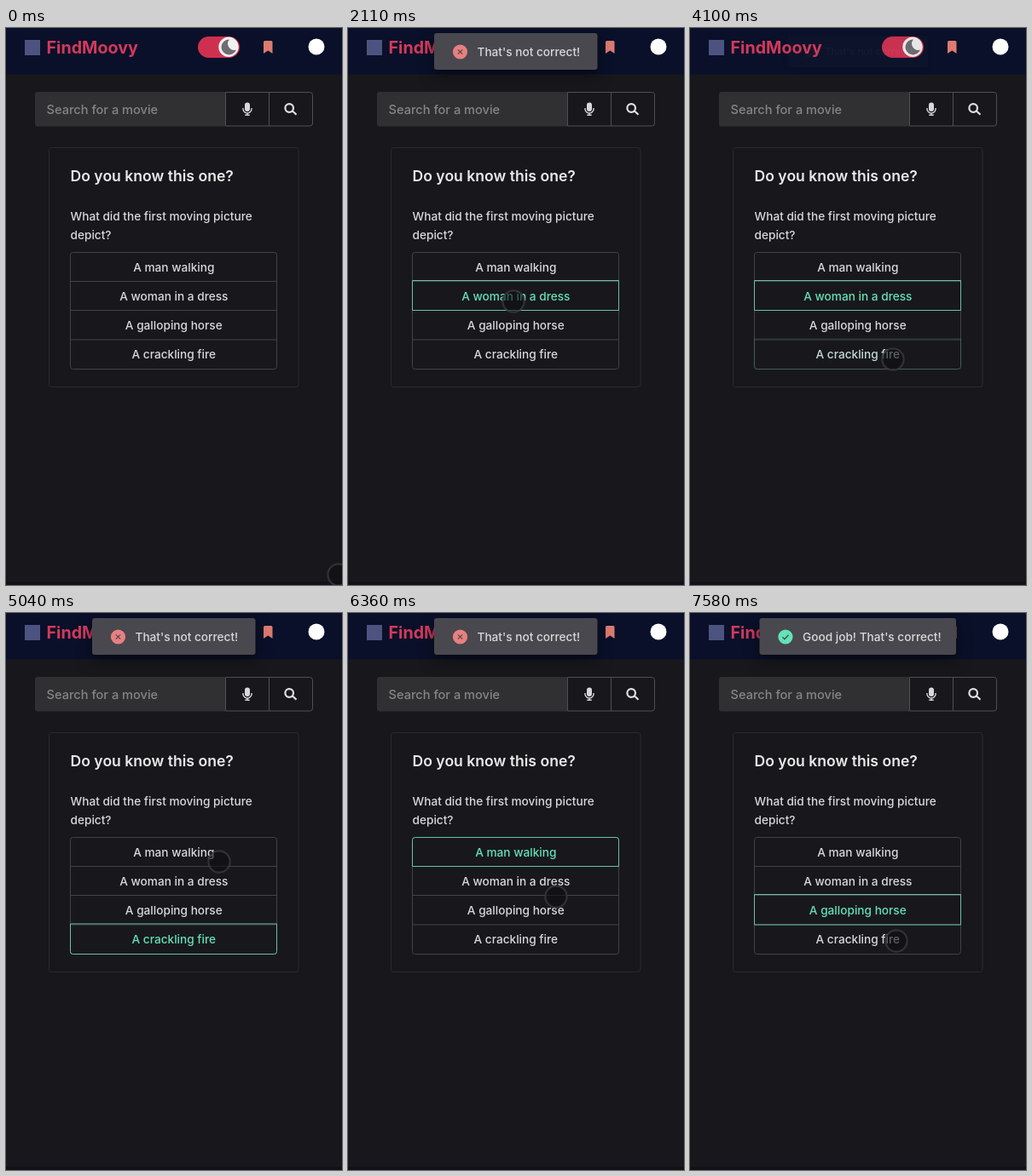
Write an HTML page that moves like this. It is 394 by 654 pixels and loops after 8000 ms.

```html
<!DOCTYPE html>
<html lang="en">
<head>
<meta charset="utf-8">
<title>Movie quiz</title>
<style>
  html, body { margin: 0; width: 100%; height: 100%; overflow: hidden; background: #18181c; }
  svg { display: block; width: 394px; height: 654px; font: 450 13.65px Inter, sans-serif; fill: #d9d9da; }
  .line { fill: none; stroke: #434347; }
  .lit { fill: none; stroke: #68c2a5; }
  .option text { text-anchor: middle; }
  .toast { transform-box: fill-box; transform-origin: center; }
  .toast > rect {
    fill: #48484e;
    filter: drop-shadow(0 3px 4px #0004) drop-shadow(0 6px 9px #0005);
  }
</style>
</head>
<body>
<svg viewBox="0 0 394 654">
  <rect width="394" height="654" fill="#18181c"/>
  <rect y="650" width="394" height="4" fill="#131118"/>
  <rect width="394" height="54.5" fill="#0a1029"/>

  <!-- header -->
  <rect x="22" y="14" width="18" height="18" fill="#4c5380"/>
  <text x="47.5" y="30" font-size="19.7" font-weight="700" fill="#d23a5b">FindMoovy</text>
  <rect x="225" y="10" width="49" height="25" rx="12.5" fill="#d03050"/>
  <circle cx="261" cy="22.3" r="11.7" fill="#f1f0f0"/>
  <path d="M262 13.4A9 9 0 1 0 270 25.500A7.500 7.500 0 0 1 262 13.400z" fill="#6d6d70"/>
  <path d="M302 16.5q0-1.5 1.5-1.5h7.5q1.5 0 1.5 1.5v13.5l-5.2-3.5l-5.3 3.5z" fill="#dc7b70"/>
  <circle cx="364" cy="22" r="9.5" fill="#fff"/>

  <!-- search bar -->
  <path d="M257 75H37q-3 0-3 3v34.5q0 3 3 3h220z" fill="#303033"/>
  <text x="47.5" y="100.5" font-size="14.6" fill="#858588">Search for a movie</text>
  <path class="line" style="stroke:#505054" d="M257.5 75.5h99q3 0 3 3v33.5q0 3-3 3h-99zM308.5 75.5v39.5"/>
  <rect x="280" y="87.5" width="6" height="10.5" rx="3"/>
  <path d="M278 94v1a5 5 0 0 0 10 0v-1M283 100v2.5M280.3 102.3h5.4" fill="none" stroke="#d7d7d9" stroke-width="1.4"/>
  <path d="M337 94a4.8 4.8 0 1 1-9.6 0a4.8 4.8 0 0 1 9.6 0M335.8 97.3l4.7 4.5" fill="none" stroke="#e0e0e2" stroke-width="2.2"/>

  <!-- quiz card -->
  <rect class="line" style="stroke:#2a2a2e" x="50.5" y="140.5" width="292.5" height="281" rx="3"/>
  <text x="75.5" y="180" font-size="17.6" font-weight="600" fill="#e9e9ea">Do you know this one?</text>
  <text x="75.5" y="226">What did the first moving picture</text>
  <text x="75.5" y="248">depict?</text>
  <g id="options"></g>

  <g id="cursor">
    <circle id="ring" r="12.6" fill="#0f0f12" fill-opacity=".6" stroke="#3a3a3d" stroke-opacity=".8" stroke-width="2.2"/>
    <g id="press">
      <circle cx="1" cy="1" r="12.5" fill="#30301a" opacity=".7"/>
      <circle r="12" fill="#8c8c08" opacity=".88"/>
    </g>
  </g>

  <g id="wrong" class="toast">
    <rect x="101" y="6" width="191.5" height="43" rx="3"/>
    <circle cx="131.5" cy="28" r="8.6" fill="#e88080"/>
    <path d="M128.8 25.3l5.4 5.4m0-5.4l-5.4 5.4" stroke="#48484e" stroke-width="1.1"/>
    <text x="151.5" y="33">That's not correct!</text>
  </g>
  <g id="right" class="toast">
    <rect x="81.5" y="6" width="230.5" height="43" rx="3"/>
    <circle cx="112" cy="28" r="8.6" fill="#63e2b7"/>
    <path d="M108.5 28.3l2.4 2.4l4.6-5" fill="none" stroke="#48484e" stroke-width="1.3"/>
    <text x="132" y="33">Good job! That's correct!</text>
  </g>
</svg>
<script>
const LOOP = 8000, FADE = 300, HOLD = 1050;
const $ = id => document.getElementById(id);
const clamp = v => Math.max(0, Math.min(1, v));
const ease = v => { v = clamp(v); return v * v * (3 - 2 * v); };
const mix = (a, b, k) => `rgb(${a.map((v, i) => Math.round(v + (b[i] - v) * k))})`;

const labels = ["A man walking", "A woman in a dress", "A galloping horse", "A crackling fire"];
const edges = [263.5, 297.5, 331.5, 366, 400.5];

// each answer: option index, press start and end, reaction time
const answers = [
  { option: 1, down: 1510, up: 1670, react: 1770 },
  { option: 3, down: 3890, up: 4050, react: 4060 },
  { option: 0, down: 5400, up: 5540, react: 5660 },
  { option: 2, down: 6750, up: 6900, react: 7040 }
];

// cursor stops: time, x, y
const path = [
  [70, 390, 642], [380, 225, 521], [640, 228, 521], [1110, 194, 321],
  [2470, 194, 321], [2800, 257, 349], [3150, 248, 356], [3350, 248, 356],
  [3560, 238, 380], [3800, 238, 380], [3860, 238, 389], [4500, 238, 389],
  [5040, 250, 292], [5300, 250, 283], [5880, 250, 283], [6100, 247, 315],
  [6340, 247, 315], [6360, 244, 333], [6550, 242, 349], [6950, 242, 349],
  [7110, 242, 378], [7400, 242, 385]
];

// box outline with corner radius a at the top and b at the bottom
const box = (top, bottom, a, b) =>
  `M75.5 ${top + a}q0 ${-a} ${a} ${-a}H${317.5 - a}q${a} 0 ${a} ${a}
   V${bottom - b}q0 ${b} ${-b} ${b}H${75.5 + b}q${-b} 0 ${-b} ${-b}z`;

function group(html) {
  const g = document.createElementNS("http://www.w3.org/2000/svg", "g");
  g.setAttribute("class", "option");
  g.innerHTML = html;
  $("options").append(g);
  return g;
}

group(`<path class="line" d="${box(edges[0], edges[4], 3, 3)}"/>` +
  edges.slice(1, 4).map(y => `<path class="line" d="M76 ${y}h241"/>`).join(""));

// a lit box overlaps the line above it
const options = labels.map((label, i) => {
  const top = edges[i], bottom = edges[i + 1];
  return group(`<path class="lit" d="${box(top - (i ? 1 : 0), bottom, i ? 0 : 3, i < 3 ? 0 : 3)}"/>
    <text x="196.8" y="${Math.round((top + bottom) / 2) + 4.5}">${label}</text>`);
});

function cursorAt(t) {
  const n = path.findIndex(p => p[0] > t);
  if (n === 0) return path[0].slice(1);
  if (n < 0) return path[path.length - 1].slice(1);
  const [t0, x0, y0] = path[n - 1], [t1, x1, y1] = path[n];
  const k = ease((t - t0) / (t1 - t0));
  return [x0 + (x1 - x0) * k, y0 + (y1 - y0) * k];
}

const shown = (t, start) =>
  ease((t - start) / FADE) * (1 - ease((t - start - HOLD) / FADE));

function setToast(el, k) {
  el.style.opacity = k;
  el.style.transform = `scale(${0.85 + 0.15 * k})`;
}

function setOption(i, k) {
  const [line, text] = options[i].children;
  line.style.opacity = k;
  text.style.fill = mix([217, 217, 218], [99, 226, 183], k);
}

function draw(t) {
  const levels = [0, 0, 0, 0];
  answers.forEach((a, n) => {
    const next = answers[n + 1];
    levels[a.option] = ease((t - a.react + 40) / FADE)
      * (next ? 1 - ease((t - next.react - 30) / FADE) : 1);
  });
  levels.forEach((k, i) => setOption(i, k));

  const [x, y] = cursorAt(t);
  const pressed = answers.some(a => t >= a.down && t < a.up);
  $("cursor").setAttribute("transform", `translate(${x} ${y})`);
  $("ring").style.display = pressed ? "none" : "";
  $("press").style.display = pressed ? "" : "none";

  setToast($("wrong"), Math.max(...answers.slice(0, 3).map(a => shown(t, a.react))));
  setToast($("right"), shown(t, answers[3].react));
}

const begin = performance.now();
function tick() {
  draw((performance.now() - begin) % LOOP);
  requestAnimationFrame(tick);
}
tick();
</script>
</body>
</html>
```
